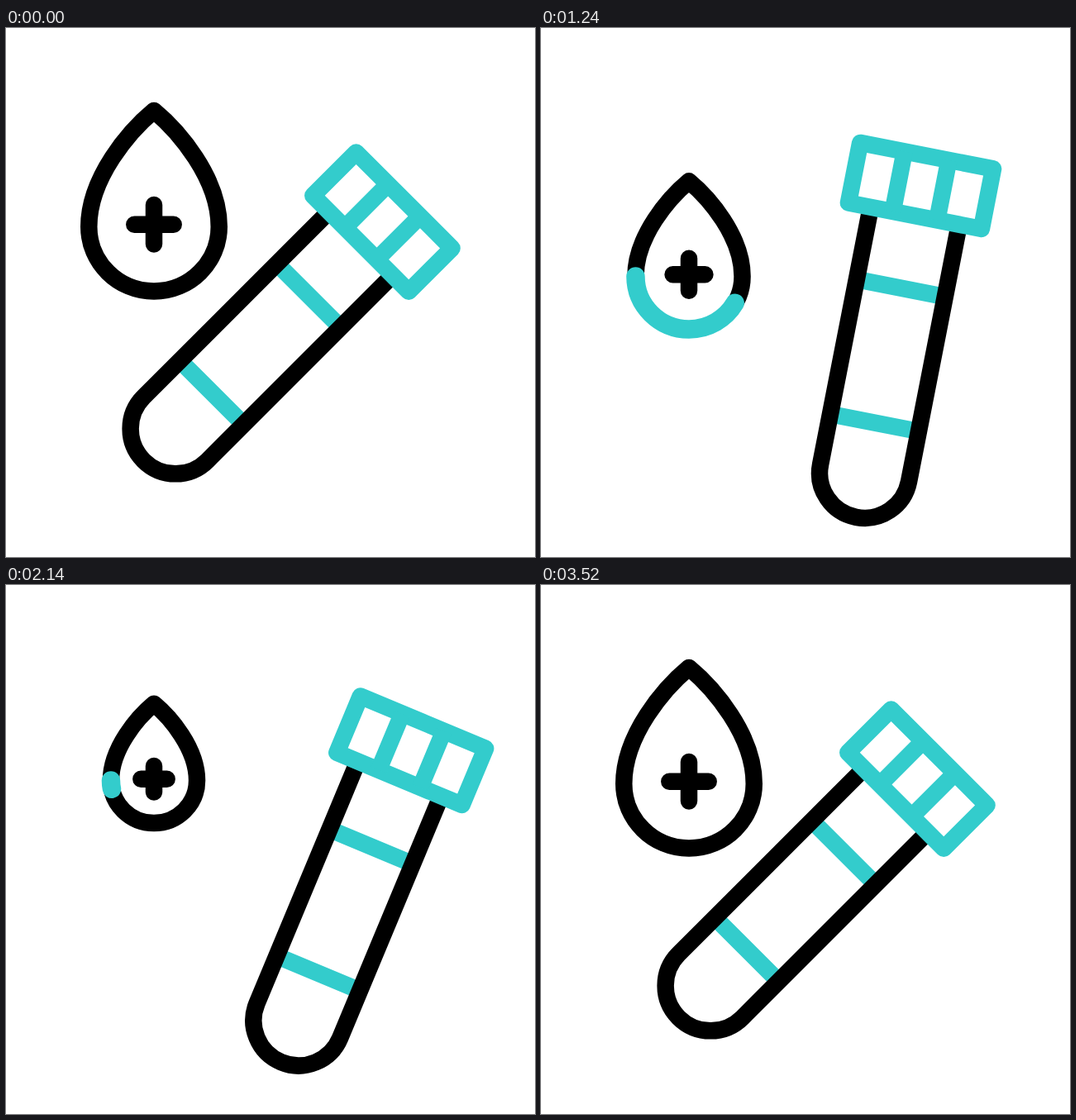
Recreate the animation shown at these times as an HTML page. Size 640 by 640 pixels, loop 3.6 s.

```html
<!DOCTYPE html>
<html lang="en">
<head>
<meta charset="utf-8">
<title>Blood test</title>
<style>
  html, body { margin: 0; width: 100%; height: 100%; overflow: hidden; background: #fff; }
  svg { display: block; width: 100vw; height: 100vh; }
  path, rect { fill: none; stroke: #000; stroke-width: 20.5; stroke-linejoin: round; }
  .teal { stroke: #33cccc; }
  .round { stroke-linecap: round; }
</style>
</head>
<body>
<svg viewBox="0 0 640 640">
  <g id="drop">
    <path id="outline" d="M-78.75 17.5C-78.75 60.5 -43.5 95.5 0 95.5S78.75 60.5 78.75 17.5C78.75 -42 29 -99 0 -123C-29 -99 -78.75 -42 -78.75 17.5Z"/>
    <path id="ring" class="teal round" pathLength="1"/>
    <path id="plus" class="round" d="M-23.7 14.8h47.4M0 -8.9v47.4"/>
  </g>
  <g id="tube">
    <path class="teal" d="M-54.5 -33h109m-109 166h109"/>
    <path d="M-54.5 -122V195a54.5 54.5 0 0 0 109 0V-122"/>
    <rect class="teal" x="-82" y="-196" width="164" height="74"/>
    <path class="teal" d="M-27.3 -196v74m54.6 0v-74"/>
  </g>
</svg>
<script>
  const LOOP = 3600, LINE = 20.5, RING_LINE = 22.5;
  const BEAT = 400, SWING_START = 1000, SWING_END = 2600;

  const $ = id => document.getElementById(id);
  const drop = $('drop'), tube = $('tube'), outline = $('outline'), ring = $('ring'), plus = $('plus');
  ring.setAttribute('d', outline.getAttribute('d'));

  const clamp = (v, lo, hi) => Math.min(hi, Math.max(lo, v));
  const mix = (a, b, u) => a + (b - a) * u;

  // Eased rise from 0 to 1 between two times.
  function ramp(t, from, to) {
    const u = clamp((t - from) / (to - from), 0, 1);
    return u * u * (3 - 2 * u);
  }

  // Eased pendulum: 0 at the left end, 1 at the right end, one beat each way.
  function pendulum(t) {
    const beats = (clamp(t, SWING_START, SWING_END) - SWING_START) / BEAT;
    return ramp(1 - Math.abs(beats % 2 - 1), 0, 1);
  }

  function drawTube(t) {
    const away = ramp(t, SWING_START - BEAT, SWING_START) - ramp(t, SWING_END, SWING_END + 2 * BEAT);
    const left = t < SWING_END - BEAT ? -15 : -9; // the last swing is shorter
    const angle = mix(45, mix(left, 25, pendulum(t)), away);
    tube.setAttribute('transform', `translate(${343 + 86 * away} 347) rotate(${angle})`);
  }

  function drawDrop(t) {
    const back = ramp(t, 1600, 2200);
    const slide = ramp(t, 1000, 1600);
    const part = slide - back;
    const y = 223 + 58 * ramp(t, 600, 1000) + 14.5 * slide - 72.5 * back;
    const scale = 1 - 0.34 * (ramp(t, 200, 2200) - ramp(t, 2200, 2800));
    drop.setAttribute('transform', `translate(179 ${y}) scale(${scale})`);

    // Line weight stays constant while the drop shrinks.
    outline.style.strokeWidth = plus.style.strokeWidth = LINE / scale;
    ring.style.strokeWidth = RING_LINE / scale;
    ring.style.strokeDasharray = `${part} 2`;
    ring.style.visibility = part > 0 ? 'visible' : 'hidden';
  }

  const start = performance.now();
  function tick() {
    const t = (performance.now() - start) % LOOP;
    drawTube(t);
    drawDrop(t);
    requestAnimationFrame(tick);
  }
  tick();
</script>
</body>
</html>
```
